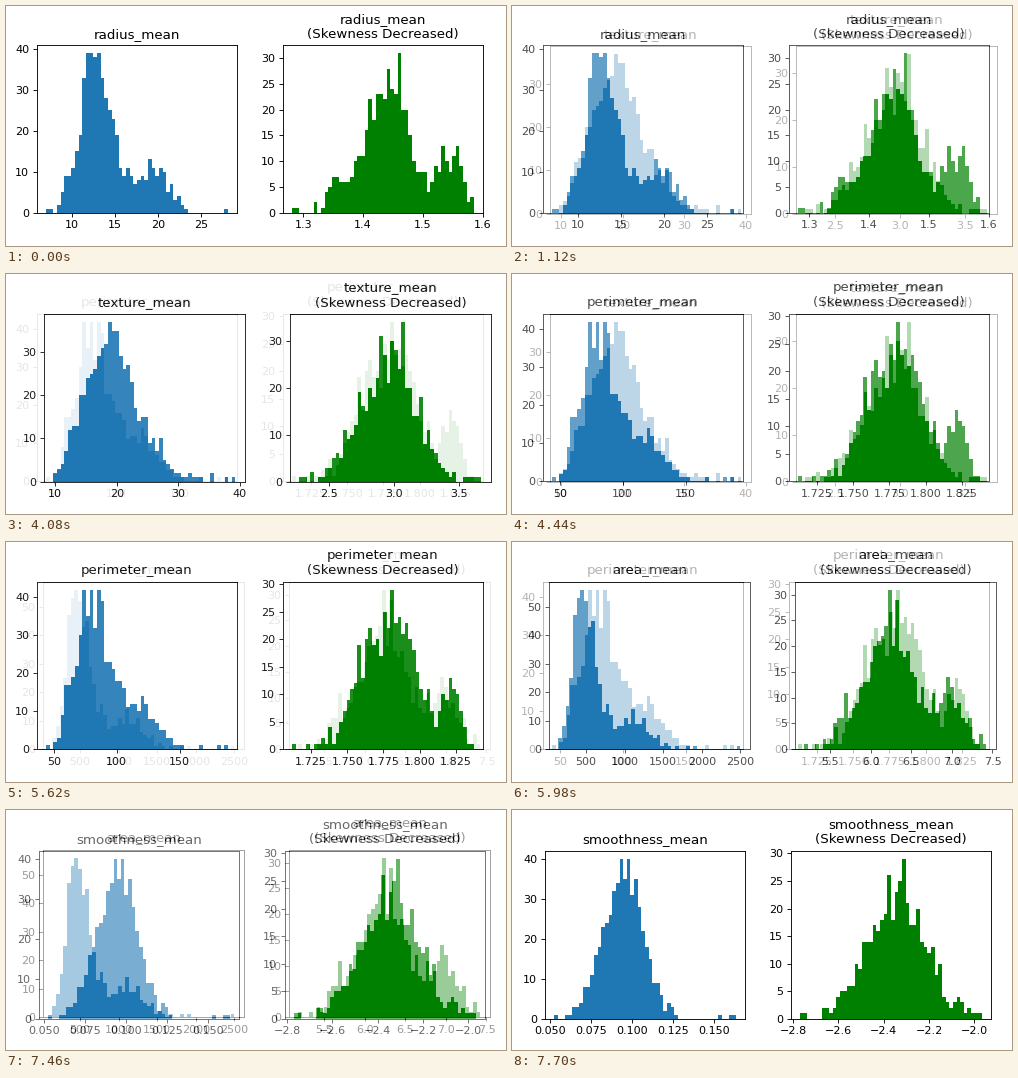
Recreate the animation shown at these times as a matplotlib script. Size 500 by 240 pixels, loop 8000 ms.

```python
import numpy as np
import matplotlib.pyplot as plt
from matplotlib.animation import FuncAnimation

W, H, DPI = 500, 240, 80
AX_W, AX_H, AX_STEP = 200.3, 167.6, 245.9
FRAME_MS, LOOP_MS = 20, 8000
FADE_STARTS = np.array([1000, 4080, 5620, 7160])
FADE_STEPS, STEP_MS = 10, 60
BINS = 50

plt.rcParams["font.family"] = "DejaVu Sans"
fig = plt.figure(figsize=(W / DPI, H / DPI), dpi=DPI, facecolor="white")
rng = np.random.default_rng(7)


def sample_counts(peak, mode, bumps):
    """Noisy counts around a sum of (height, centre, width) bell curves."""
    x = np.arange(BINS)
    mean = 0.3 + sum(h * np.exp(-0.5 * ((x - c) / s) ** 2) for h, c, s in bumps)
    counts = np.rint(0.4 * mean + 0.6 * rng.poisson(mean))
    counts = np.minimum(counts, peak)
    counts[mode] = peak
    counts[[0, -1]] = np.maximum(counts[[0, -1]], 1)
    return counts


def histogram(left, top, title, color, span, peak, mode, *bumps):
    bottom = H - top - AX_H
    ax = fig.add_axes([left / W, bottom / H, AX_W / W, AX_H / H])
    edges = np.linspace(*span, BINS + 1)
    ax.hist(edges[:-1], edges, weights=sample_counts(peak, mode, bumps), color=color)
    ax.set_title(title, pad=6.75)


def slide(left, top, name, raw, reduced):
    """Draw a pair of histograms and return the picture as an array."""
    fig.clear()
    histogram(left, top, name, "C0", *raw)
    histogram(left + AX_STEP, top, name + "\n(Skewness Decreased)", "green", *reduced)
    fig.canvas.draw()
    return np.array(fig.canvas.buffer_rgba())[..., :3].astype(float)


# Each panel: value range, tallest count, its bin, then the bell curves.
slides = [
    slide(30.9, 39.1, "radius_mean",
          ((6.981, 28.11), 39, 11, (34, 12, 3), (16, 17.3, 2.8), (10, 28, 5), (5, 6, 2)),
          ((1.281, 1.5855), 31, 29, (25, 26, 6), (11, 43, 3), (4, 12, 2.5))),
    slide(38.3, 40.0, "texture_mean",
          ((9.71, 39.28), 37, 15, (33, 14.5, 6.3), (5, 28, 4)),
          ((2.273, 3.671), 34, 28, (26, 23.5, 7.5))),
    slide(30.9, 39.6, "perimeter_mean",
          ((43.79, 188.5), 42, 10, (37, 13, 3.6), (12, 25, 5), (13, 6, 2)),
          ((1.7116, 1.8377), 29, 27, (24, 26, 7.5), (11, 43.3, 2))),
    slide(37.3, 39.6, "area_mean",
          ((143.5, 2501), 56, 6, (54, 6.5, 2.9), (9, 12, 2.5), (11, 21, 3.5)),
          ((5.18, 7.425), 31, 23, (25, 23.5, 6), (10, 40.5, 3.3), (4, 10, 2.5))),
    slide(32.9, 41.0, "smoothness_mean",
          ((0.05263, 0.1634), 40, 20, (36, 18.5, 5.6)),
          ((-2.77, -1.966), 29, 28, (23, 26, 8))),
]

fig.clear()
stage = fig.add_axes([0, 0, 1, 1])
stage.axis("off")
view = stage.imshow(slides[0].astype(np.uint8), aspect="auto", interpolation="nearest")


def update(frame):
    # Each cross-fade advances in ten equal jumps, the last one complete.
    t = frame * FRAME_MS
    steps = np.clip((t - FADE_STARTS) // STEP_MS + 1, 0, FADE_STEPS).sum()
    i, part = divmod(int(steps), FADE_STEPS)
    picture = slides[i]
    if part:
        mix = part / FADE_STEPS
        picture = picture * (1 - mix) + slides[i + 1] * mix
    view.set_data(np.rint(picture).astype(np.uint8))
    return [view]


anim = FuncAnimation(fig, update, frames=LOOP_MS // FRAME_MS, interval=FRAME_MS,
                     repeat=True, repeat_delay=0)
plt.show()
```
